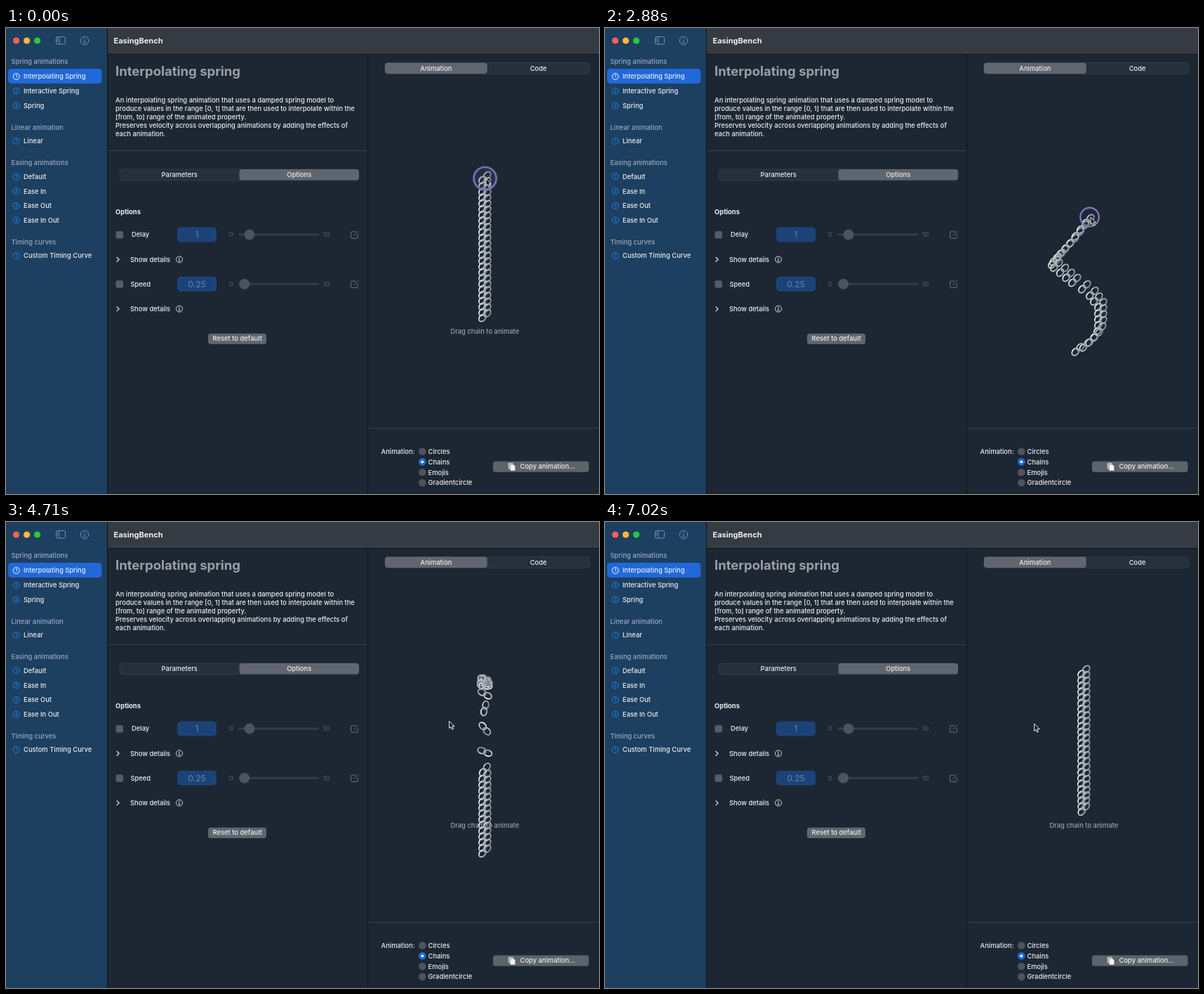
These frames come from a looping animation (845 by 663 pixels, 7.05 s). An HTML page:

```html
<!DOCTYPE html>
<html lang="en">
<head>
<meta charset="utf-8">
<title>Spring animation</title>
<style>
html, body { margin: 0; width: 100%; height: 100%; overflow: hidden; background: #1d2733; }
svg { display: block; }
text { font: 450 9.4px Inter, "Open Sans", sans-serif; fill: #eceef0; white-space: pre; }
.mid { text-anchor: middle; }
.bold { font-weight: 700; }
.head { fill: #98abc0; }
.dim { fill: #4d5660; }
.hint { fill: #999fa6; }
.value { font-size: 12px; fill: #587ba8; }
.line { fill: none; stroke-linecap: round; stroke-linejoin: round; }
</style>
</head>
<body>
<svg id="stage" width="845" height="663" viewBox="0 0 845 663">
  <defs>
    <g id="oval" fill="none">
      <ellipse rx="5.9" ry="4.2" stroke="#59636e" stroke-width="2.2"/>
      <ellipse rx="5.9" ry="4.2" stroke="#d3d8dc" stroke-width="1.25"/>
      <path d="M-4.6-2.6A5.9 4.2 0 0 1 2.8-3.7" stroke="#f3f5f6" stroke-width="1.1"/>
      <path d="M4.7 2.5A5.9 4.2 0 0 1-2 4" stroke="#8c969f" stroke-width="1.1"/>
    </g>
    <g id="link">
      <use href="#oval" transform="translate(3.4 -3.3) rotate(-48)" opacity=".82"/>
      <use href="#oval" transform="translate(-3.4 3.3) rotate(-48)"/>
    </g>
  </defs>
  <g id="ui"></g>
  <text id="hint" class="mid hint" x="682.3" y="434.8">Drag chain to animate</text>
  <g id="chain"></g>
  <g id="ring" fill="none">
    <circle id="halo" stroke="#4f5285" stroke-opacity=".6"/>
    <circle id="rim" stroke="#8582c2" stroke-width="1.7"/>
  </g>
  <path id="cursor" d="M0 0V10.3L2.3 8.2L4 12L5.8 11.2L4.2 7.5H7.4Z" fill="#15191f" stroke="#f4f4f4" stroke-width="1" stroke-linejoin="round"/>
</svg>
<script>
const NS = 'http://www.w3.org/2000/svg';
const $ = id => document.getElementById(id);
const ui = $('ui');

function add(tag, attrs, parent = ui) {
  const el = document.createElementNS(NS, tag);
  for (const k in attrs) el.setAttribute(k, attrs[k]);
  parent.appendChild(el);
  return el;
}
const rect = (x, y, width, height, fill, rx = 0) => add('rect', { x, y, width, height, fill, rx });
const dot = (cx, cy, r, fill) => add('circle', { cx, cy, r, fill });
const line = (d, stroke, width = 1) => add('path', { d, stroke, 'stroke-width': width, class: 'line' });
function label(x, y, str, cls = '', style = '') {
  add('text', { x, y: y + 3.4, class: cls, style }).textContent = str;
}
function badge(x, y, str, color) {
  add('circle', { cx: x, cy: y, r: 4.5, fill: 'none', stroke: color, 'stroke-width': 1 });
  add('text', { x, y: y + 2.1, class: 'mid', style: `font-size:5.8px;font-weight:600;fill:${color}` }).textContent = str;
}
function info(x, y, r, color) {
  add('circle', { cx: x, cy: y, r, fill: 'none', stroke: color });
  dot(x, y - r * .45, .75, color);
  line(`M${x - .7} ${y - .5}H${x}V${y + r * .5}M${x - 1} ${y + r * .5}H${x + 1}`, color, .9);
}

// Window panels
rect(0, 0, 144, 663, '#1d3f60');
rect(145, 0, 700, 37, '#363a42');
rect(145, 37, 700, 1, '#11161c');
rect(144, 0, 1, 663, '#0c1219');
rect(515, 38, 1, 625, '#0d141b');
rect(145, 174, 370, 1, '#36404b');
rect(516, 569, 329, 1, '#36404b');

// Title bar
['#fc5f57', '#fdbb2e', '#28c840'].forEach((c, i) => dot(14.6 + 15 * i, 18, 4.6, c));
add('rect', { x: 71.5, y: 12.5, width: 13, height: 10.5, rx: 1.8, fill: 'none', stroke: '#7890a8' });
line('M76 12.5V23M73 15H74.5M73 17H74.5M73 19H74.5', '#7890a8', .9);
info(112, 18, 5.7, '#7890a8');
label(153.5, 18.2, 'EasingBench', 'bold', 'font-size:11px');

// Sidebar
rect(3, 58, 133.5, 21, '#2168d8', 4.5);
const menu = [
  [48, 'Spring animations', 'Interpolating Spring', 'Interactive Spring', 'Spring'],
  [141.5, 'Linear animation', 'Linear'],
  [192, 'Easing animations', 'Default', 'Ease In', 'Ease Out', 'Ease In Out'],
  [304.5, 'Timing curves', 'Custom Timing Curve']
];
menu.forEach(([y, title, ...items], group) => {
  label(7.5, y, title, 'head');
  items.forEach((item, i) => {
    const row = y + (group ? 19.4 : 21) + 20.75 * i;
    badge(14.7, row, i + 1, group + i ? '#1687f5' : '#fff');
    label(25, row, item);
  });
});

// Description
label(156, 64.6, 'Interpolating spring', 'bold', 'font-size:18.5px;fill:#9a9fa5');
['An interpolating spring animation that uses a damped spring model to',
 'produce values in the range [0, 1] that are then used to interpolate within the',
 '[from, to] range of the animated property.',
 'Preserves velocity across overlapping animations by adding the effects of',
 'each animation.'].forEach((s, i) => label(156, 102.7 + 11.85 * i, s));

function segmented(x, y, width, names, active) {
  const half = width / 2;
  add('rect', { x, y, width, height: 16, rx: 4, fill: '#26303b', stroke: '#35404a', 'stroke-width': .8 });
  rect(x + half * active, y, half, 15.6, '#60666f', 4);
  names.forEach((s, i) => label(x + half * (i + .5), y + 7.7, s, 'mid'));
}
segmented(162, 201, 341, ['Parameters', 'Options'], 1);
segmented(540, 49.5, 291.5, ['Animation', 'Code'], 0);

// Options
label(156, 262, 'Options', 'bold');
function option(y, name, nameX, value, knob) {
  rect(156.5, y - 5, 10.5, 10.5, '#555c65', 2.5);
  label(nameX, y, name);
  rect(244, y - 10.5, 56, 21, '#1c4377', 5);
  add('text', { x: 272, y: y + 4.3, class: 'mid value' }).textContent = value;
  label(317.8, y, '0', 'dim');
  rect(331, y - 1.5, 115, 3, '#333d48', 1.5);
  dot(knob, y, 7.5, '#4b535c');
  label(451.5, y, '10', 'dim');
  line(`M498 ${y - 4.2}H493Q491.7 ${y - 4.2} 491.7 ${y - 3}V${y + 4}Q491.7 ${y + 5.2} 493 ${y + 5.2}H500Q501.2 ${y + 5.2} 501.2 ${y + 4}V${y - .5}M496 ${y + 1.2}L502 ${y - 5}`, '#69717a');
  const low = y + 35.3;
  line(`M158 ${low - 3}L161.2 ${low}L158 ${low + 3}`, '#e4e7ea', 1.2);
  label(177, low, 'Show details');
  info(247, low, 4.5, '#d4d8dc');
}
option(294, 'Delay', 179, '1', 347);
option(364.3, 'Speed', 177.5, '0.25', 339.7);
rect(288, 434.8, 83, 15, '#60666f', 3.5);
label(329.7, 442, 'Reset to default', 'mid');

// Animation picker
label(534.5, 602.5, 'Animation:');
['Circles', 'Chains', 'Emojis', 'Gradientcircle'].forEach((s, i) => {
  const y = 602.5 + 14.85 * i;
  dot(593.3, y, 5.3, i === 1 ? '#1c6ae0' : '#4d545d');
  if (i === 1) dot(593.3, y, 1.9, '#fff');
  label(601.5, y, s);
});
rect(694, 616.5, 136.5, 15.3, '#5c636b', 3.5);
rect(715.8, 618.8, 7, 8.8, '#c4c8cc', 1);
add('path', { d: 'M718.2 620.8H723L725.8 623.6V630H718.2Z', fill: '#f2f3f4', stroke: '#5c636b', 'stroke-width': .6 });
label(732.5, 624, 'Copy animation...');

// Motion
const LOOP = 7050, STEP = 30, COUNT = 25, GAP = 8.17, LAG = 44;
const HOME = [682.3, 213], RELEASE = 4260, LEAD = 130;
// Drag offset of the first link: time, x, y
const DRAG = [
  [280, 0, 0], [348, -6, 5], [436, -20, 8], [524, -33, 13], [612, -43, 14], [700, -47, 13],
  [744, -46, 15], [788, -39, 20], [832, -27, 24], [876, -13, 29], [920, -2, 34], [964, 6, 37],
  [1052, 13, 40], [1140, 16, 43], [1188, 15, 42], [1232, 11, 41], [1276, 1, 40], [1320, -11, 40],
  [1408, -27, 39], [1452, -33, 39], [1496, -35, 39], [1672, -36, 41], [1716, -33, 42], [1760, -26, 44],
  [1848, -2, 50], [1892, 8, 51], [1980, 22, 52], [2030, 24, 51], [2176, 24, 50], [2264, 12, 50],
  [2308, 1, 49], [2352, -13, 48], [2484, -39, 51], [2528, -42, 55], [2572, -40, 59], [2660, -30, 64],
  [2748, -16, 65], [2880, 6, 61], [3010, 8, 55], [3114, 8, 32], [3202, 7, 31], [3246, 7, 31],
  [3290, 6, 34], [3334, 1, 44], [3378, -1, 57], [3422, 0, 59]
];
const clamp = v => Math.min(1, Math.max(0, v));

function drag(t) {
  const n = DRAG.findIndex(p => p[0] > t);
  if (n < 0) return DRAG[DRAG.length - 1].slice(1);
  if (n === 0) return [0, 0];
  const a = DRAG[n - 1], b = DRAG[n], u = (t - a[0]) / (b[0] - a[0]);
  return [a[1] + (b[1] - a[1]) * u, a[2] + (b[2] - a[2]) * u];
}

// Share of the offset left after release: a quick drop plus a long ringing
function remain(ms) {
  if (ms <= 0) return 1;
  const s = ms / 1000;
  return .4 * Math.exp(-((s / .09) ** 2)) + .6 * Math.exp(-2.2 * s) * Math.cos(13 * s);
}

const links = Array.from({ length: COUNT }, () => add('use', { href: '#link' }, $('chain')));

function draw(t) {
  links.forEach((el, i) => {
    const own = t - LAG * i, left = remain(own - RELEASE), [dx, dy] = drag(own);
    const x = HOME[0] + dx * left, y = HOME[1] + GAP * i + dy * left;
    el.setAttribute('transform', `translate(${x.toFixed(2)} ${y.toFixed(2)}) rotate(${(360 * left).toFixed(1)})`);
  });

  const [px, py] = drag(t + LEAD);
  const cx = HOME[0] + .3 + px, cy = HOME[1] + 1 + py;
  const press = 1 - clamp(t / 120), lift = clamp((t - 4110) / 240);
  const grow = 1 - (1 - lift) ** 2;
  const wide = Math.max(press, clamp(lift * 4));
  for (const id of ['halo', 'rim']) {
    $(id).setAttribute('cx', cx);
    $(id).setAttribute('cy', cy);
    $(id).setAttribute('r', 13.3 + 2.7 * press + 18 * grow);
  }
  $('halo').setAttribute('stroke-width', 3 + 1.2 * wide);
  $('halo').setAttribute('fill', `rgba(70,72,130,${.06 + .14 * wide})`);
  $('rim').setAttribute('opacity', 1 - .75 * clamp(lift * 4));
  $('ring').setAttribute('opacity', 1 - lift);

  const u = clamp((t - 4350) / 550), go = u * u * (3 - 2 * u);
  const tx = cx + 1.4, ty = cy + .3;
  $('cursor').setAttribute('transform', `translate(${tx + (611.7 - tx) * go} ${ty + (287 - ty) * go})`);

  $('hint').setAttribute('opacity', t < 1000 ? 1 - clamp((t - 180) / 150) : clamp((t - 4350) / 300));
}

const start = performance.now();
function tick() {
  const t = (performance.now() - start) % LOOP;
  draw(Math.floor(t / STEP) * STEP);
  requestAnimationFrame(tick);
}
tick();
</script>
</body>
</html>
```
